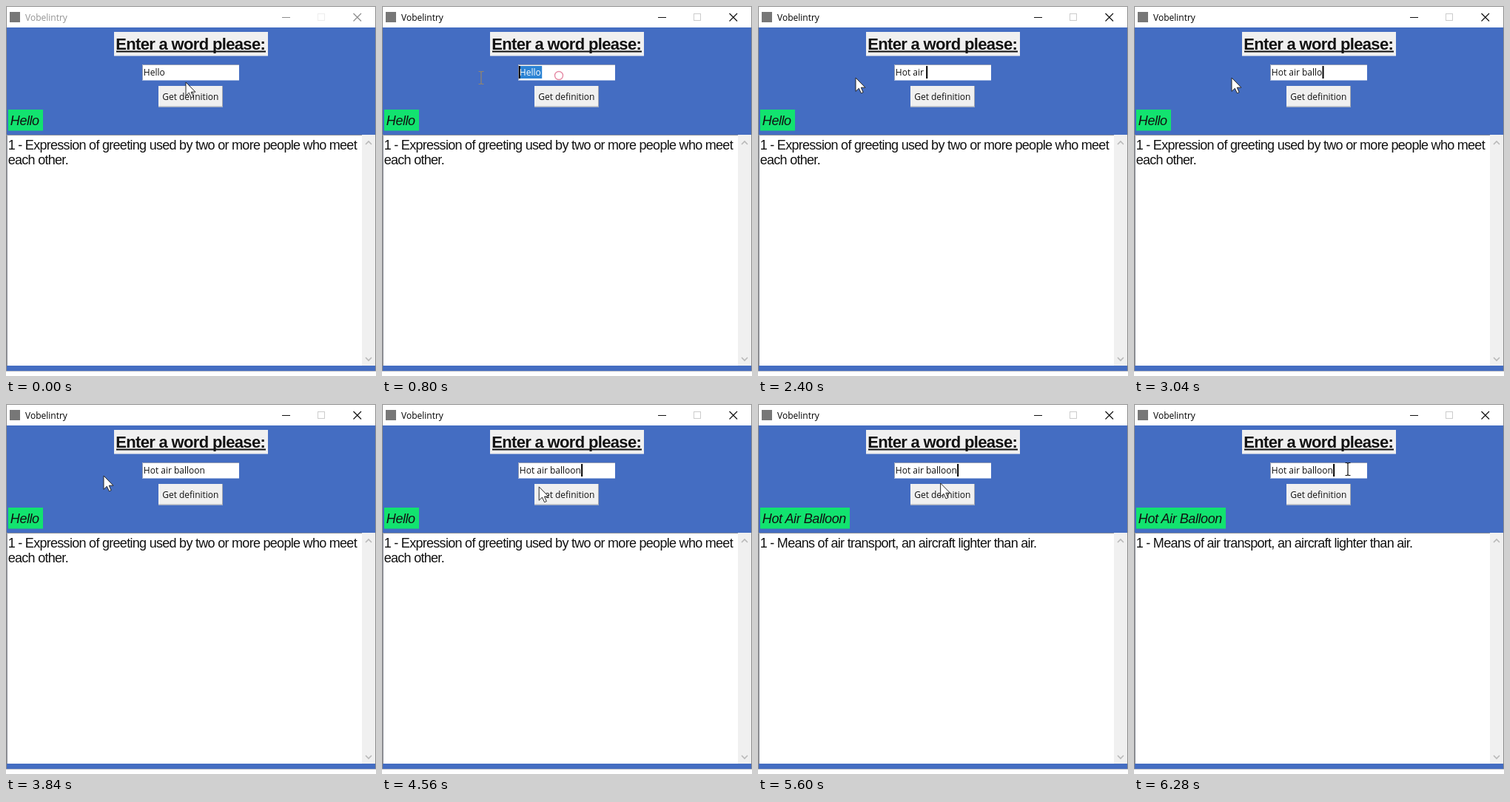
These frames come from a looping animation (500x500 px, 6320 ms). An HTML page:

```html
<!DOCTYPE html>
<html lang="en">
<head>
<meta charset="utf-8">
<title>Vobelintry</title>
<style>
  html, body { margin: 0; width: 100%; height: 100%; overflow: hidden; background: #fff; }
  svg { display: block; width: 100vw; height: 100vh; }
  text { white-space: pre; fill: #111; }
  .ui { font: 12px "Open Sans", sans-serif; }
  .head { font: bold 22px "Liberation Sans", Arial, sans-serif; letter-spacing: -.66px; }
  .word { font: italic 18px "Liberation Sans", Arial, sans-serif; letter-spacing: -.42px; }
  .body { font: 18px "Liberation Sans", Arial, sans-serif; letter-spacing: -.71px; }
  .line { fill: none; }
</style>
</head>
<body>
<svg viewBox="0 0 500 500">
  <rect width="500" height="500" fill="#fff"/>
  <rect y="29" width="500" height="464" fill="#446dc2"/>

  <rect x="5" y="8" width="14" height="14" fill="#777"/>
  <text id="name" class="ui" x="26" y="19.5">Vobelintry</text>
  <path id="buttons" class="line" d="M373 15.5H384M469.5 10L480 20.5M480 10L469.5 20.5" stroke-width="1.2"/>
  <rect id="max" class="line" x="421.5" y="10.5" width="9" height="9"/>

  <rect x="146" y="35" width="208" height="32.5" fill="#f0f0f0"/>
  <text class="head" x="148.2" y="59">Enter a word please:</text>
  <rect x="149" y="60.5" width="202" height="2" fill="#111"/>

  <rect x="184" y="79" width="131" height="21.5" fill="#fff"/>
  <path class="line" d="M184.5 100V79.5H315" stroke="#98a0b4"/>
  <rect id="sel" y="81" height="17" fill="#2d84d4"/>
  <text class="ui" x="185.8" y="94.3" id="entry"><tspan id="plain"></tspan><tspan id="picked" fill="#fff"></tspan></text>
  <rect id="caret" y="81" width="2" height="17"/>

  <g id="up">
    <rect x="206" y="108" width="87" height="28.5" fill="#f0f0f0"/>
    <path class="line" d="M292.5 108V136H206" stroke="#a3a6ae"/>
  </g>
  <g id="down">
    <rect x="207" y="109" width="87.5" height="28.5" fill="#f0f0f0"/>
    <path class="line" d="M207.5 137.5V109.5H294" stroke="#6c6f78"/>
  </g>
  <text id="label" class="ui" x="211.2" y="127">Get definition</text>

  <rect id="tag" x="3" y="140" height="28.5" fill="#12e36f"/>
  <text id="word" class="word" x="5.8" y="161"></text>

  <rect x="1" y="174" width="480" height="312" fill="#fff"/>
  <path class="line" d="M1.5 486V174.5H481" stroke="#8f939c"/>
  <text id="line1" class="body" x="2.7" y="193.5"></text>
  <text id="line2" class="body" x="2.7" y="214"></text>
  <rect x="481" y="174" width="18" height="312" fill="#f0f0f0"/>
  <path class="line" d="M486 187L490 183L494 187M486 475L490 479L494 475" stroke="#b9b9b9" stroke-width="1.6"/>
  <path class="line" d="M.5 493V.5H499.5V493" stroke="#8b8b8b"/>
  <path class="line" d="M0 493.5H500" stroke="#b5b9c4"/>

  <circle id="ring" class="line" cx="239" cy="94" r="5.5" stroke="#e58ba5" stroke-width="1.4"/>
  <path id="arrow" d="M0 0V17L4 13.2L6.8 19.3L9.4 18.2L6.7 12.2H12Z" fill="#fff" stroke="#222" stroke-width=".9"/>
  <path id="beam" class="line" d="M-3.5 -8.5H-1L0 -7.5L1 -8.5H3.5M0 -7.5V7.5M-3.5 8.5H-1L0 7.5L1 8.5H3.5" stroke-width="1.2"/>
</svg>
<script>
const LOOP = 6320;
const PRESS = 360, RELEASE = 960, CLICK = 4960, RESULT = 5160;
const LEFT = 185.8;
const NEW_WORD = 'Hot air balloon';
const KEYS = [1360, 1560, 1760, 1900, 2040, 2180, 2280, 2380,
              2560, 2680, 2780, 2900, 3000, 3120, 3240];
// time, x, y of the pointer
const PATH = [[0, 243, 103], [40, 243, 103], [260, 239, 94], [PRESS, 239, 94],
              [760, 134, 97], [RELEASE, 134, 97], [1000, 132, 97], [4120, 132, 97],
              [4720, 229, 115], [5400, 229, 115], [5960, 289, 88], [LOOP, 289, 88]];

const el = {};
for (const node of document.querySelectorAll('[id]')) el[node.id] = node;

const set = (node, attrs) => {
  for (const key in attrs) node.setAttribute(key, attrs[key]);
};
const show = (node, on) => set(node, { visibility: on ? 'visible' : 'hidden' });
const write = (node, text) => {
  if (node.textContent !== text) node.textContent = text;
};
const ease = u => u * u * (3 - 2 * u);

function pointer(t) {
  const i = PATH.findIndex(p => p[0] > t);
  const [t0, x0, y0] = PATH[i - 1], [t1, x1, y1] = PATH[i];
  const u = ease((t - t0) / (t1 - t0));
  return [x0 + (x1 - x0) * u, y0 + (y1 - y0) * u];
}

function caretOn(t) {
  if (t < PRESS) return false;
  const from = KEYS.filter(k => k <= t).pop() ?? PRESS;
  return t < KEYS[0] || (t - from) % 900 < 600;
}

function drawWindow(t) {
  const active = t >= PRESS;
  el.name.style.fill = active ? '#000' : '#929292';
  set(el.buttons, { stroke: active ? '#111' : '#8c8c8c' });
  set(el.max, { stroke: active ? '#ccc' : '#eee' });

  const pressed = t >= CLICK && t < RESULT;
  show(el.up, !pressed);
  show(el.down, pressed);
  set(el.label, { transform: pressed ? 'translate(1 1.4)' : '' });

  const done = t >= RESULT;
  write(el.word, done ? 'Hot Air Balloon' : 'Hello');
  set(el.tag, { width: done ? 121 : 47 });
  write(el.line1, done ? '1 - Means of air transport, an aircraft lighter than air.'
                       : '1 - Expression of greeting used by two or more people who meet');
  write(el.line2, done ? '' : 'each other.');
}

function drawEntry(t, x) {
  const typed = KEYS.filter(k => k <= t).length;
  const text = typed ? NEW_WORD.slice(0, typed) : 'Hello';
  write(el.plain, text);
  write(el.picked, '');
  const widthOf = n => n ? el.entry.getSubStringLength(0, n) : 0;
  const full = widthOf(text.length);

  let at = text.length;
  if (!typed && t >= PRESS) {
    while (at > 0 && LEFT + (widthOf(at - 1) + widthOf(at)) / 2 > x) at--;
  }
  const start = widthOf(at);
  write(el.plain, text.slice(0, at));
  write(el.picked, text.slice(at));
  set(el.sel, { x: LEFT + start + .5, width: at < text.length ? full - start + 1 : 0 });
  set(el.caret, { x: LEFT + start + (at ? .2 : -1) });
  show(el.caret, caretOn(t));
}

function drawPointer(t, x, y) {
  const dragging = t >= PRESS && t < RELEASE;
  const inEntry = x > 184 && x < 315 && y > 79 && y < 100;
  const beam = dragging || inEntry;
  show(el.beam, beam);
  show(el.arrow, !beam);
  show(el.ring, dragging);
  set(el.beam, { transform: `translate(${x} ${y})`, stroke: inEntry ? '#111' : '#94866c' });
  set(el.arrow, { transform: `translate(${x} ${y}) scale(1.08)` });
}

function draw(t) {
  const [x, y] = pointer(t);
  drawWindow(t);
  drawEntry(t, x);
  drawPointer(t, x, y);
}

const began = performance.now();
function tick() {
  draw((performance.now() - began) % LOOP);
  requestAnimationFrame(tick);
}
tick();
</script>
</body>
</html>
```
